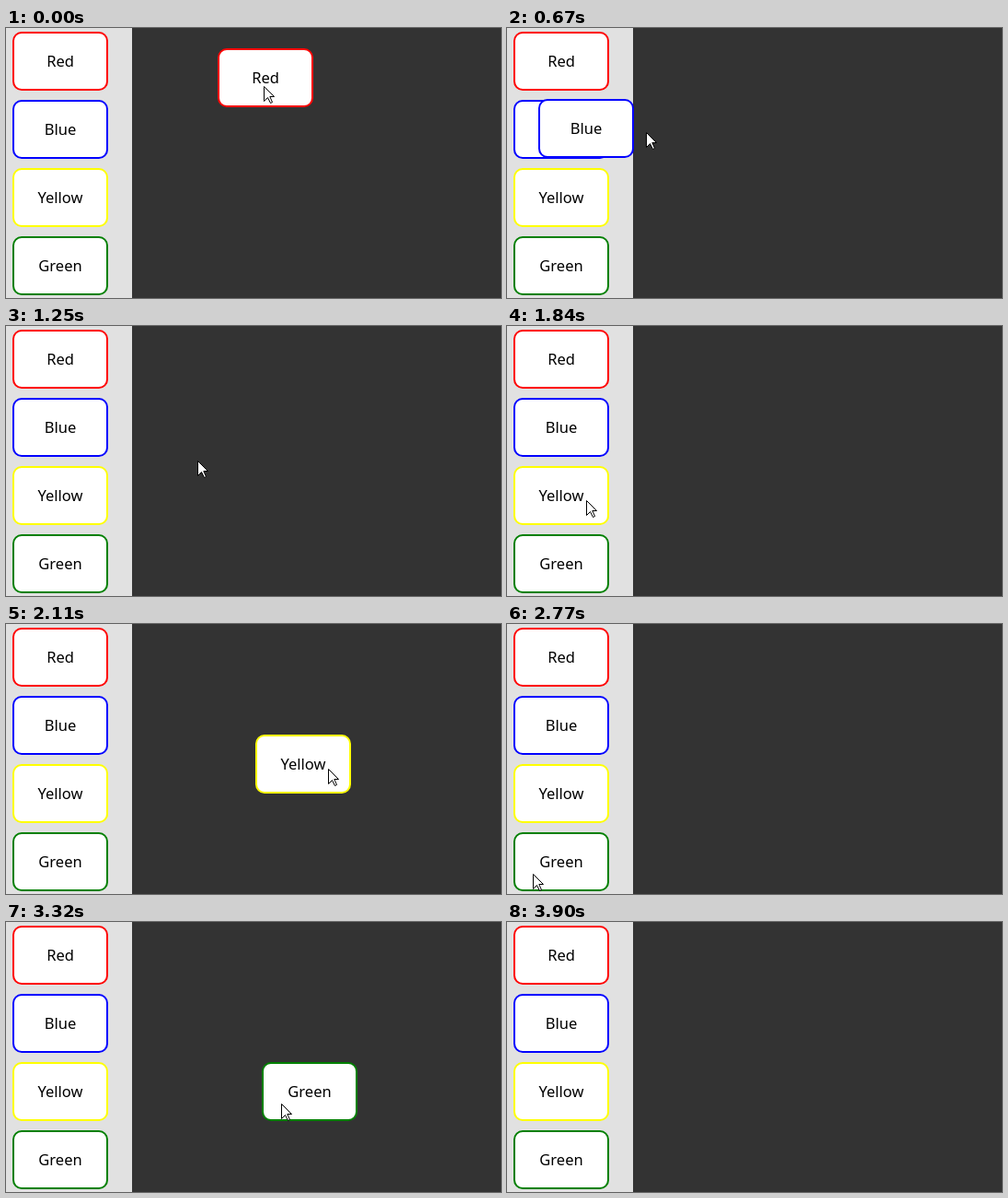
An HTML page for the animation above (4150 ms loop, 538x293 px).

```html
<!DOCTYPE html>
<html lang="en">
<head>
<meta charset="utf-8">
<title>Drag and drop cards</title>
<style>
  html, body { margin: 0; width: 100%; height: 100%; overflow: hidden; background: #333; }
  svg { display: block; }
  rect { fill: #fff; stroke-width: 2; }
  text { font: 16.5px "Noto Sans", "Open Sans", sans-serif; text-anchor: middle; }
</style>
</head>
<body>
<svg id="stage" width="538" height="293">
  <path d="M0 0H137V293H0Z" fill="#e1e1e1"/>
</svg>
<script>
const LOOP = 4150;
const TICK = 139;  // the pointer is sampled once per tick
const CYCLE = 8;   // ticks from one drop to the next
const GLIDE = 4;   // ticks to reach the next card
const stage = document.getElementById('stage');

// start: tick of pick-up; pick, drop: pointer points; rush: how fast the pointer sets off
const cards = [
  { name: 'Red', start: -4, pick: [57, 45], drop: [280, 63] },
  { name: 'Blue', start: 4, pick: [109, 114], drop: [349, 109], rush: 1.1 },
  { name: 'Yellow', start: 13, pick: [86, 189], drop: [350, 157], rush: 2.67 },
  { name: 'Green', start: 20, pick: [28, 271], drop: [299, 197], rush: 1.85 },
];
const exit = { start: Infinity, pick: [538, 293], rush: 2.2 };
const stops = [...cards, exit];

const home = i => [7, 4 + 74 * i];
const mix = (a, b, u) => a + (b - a) * u;
const easeOut = (u, power) => 1 - (1 - u) ** power;
const easeInOut = u => u < 0.5 ? (2 * u) ** 2.6 / 2 : 1 - (2 - 2 * u) ** 2.6 / 2;

function add(tag, attrs, parent = stage) {
  const el = document.createElementNS('http://www.w3.org/2000/svg', tag);
  for (const key in attrs) el.setAttribute(key, attrs[key]);
  return parent.appendChild(el);
}

function move(el, x, y) {
  el.setAttribute('transform', `translate(${Math.round(x)} ${Math.round(y)})`);
}

function makeCard({ name }) {
  const g = add('g', {});
  add('rect', { x: 1, y: 1, width: 102, height: 62, rx: 9, stroke: name.toLowerCase() }, g);
  add('text', { x: 52, y: 38 }, g).textContent = name;
  return g;
}

cards.forEach((card, i) => move(makeCard(card), ...home(i)));
const ghosts = cards.map(makeCard);
const pointer = add('path', {
  d: 'M.5 .5V16.5L4.5 12.5L7.5 18.5L9.5 17.5L6.8 11.5H11.5Z',
  fill: '#fff', stroke: '#000',
});

function draw(t) {
  const tick = Math.floor((t + 30) / TICK);
  const turn = Math.ceil(tick / CYCLE);
  const { start, pick, drop, rush } = stops[turn];
  const dragging = tick > start;

  ghosts.forEach((ghost, i) => {
    ghost.style.display = dragging && i === turn ? '' : 'none';
  });

  if (dragging) {
    const u = easeInOut(Math.min((tick - start) / (turn * CYCLE - 1 - start), 1));
    const trail = u ** 1.25;  // the card lags a little behind the pointer
    const [x, y] = home(turn);
    move(pointer, mix(pick[0], drop[0], u), mix(pick[1], drop[1], u));
    move(ghosts[turn], x + (drop[0] - pick[0]) * trail, y + (drop[1] - pick[1]) * trail);
  } else {
    const from = stops[turn - 1].drop;
    const u = Math.min((tick - (turn - 1) * CYCLE) / GLIDE, 1);
    move(pointer,
      mix(from[0], pick[0], easeOut(u, rush)),
      mix(from[1], pick[1], easeOut(u, rush * 0.8)));
  }
}

const begin = performance.now();
function frame() {
  draw((performance.now() - begin) % LOOP);
  requestAnimationFrame(frame);
}
frame();
</script>
</body>
</html>
```
